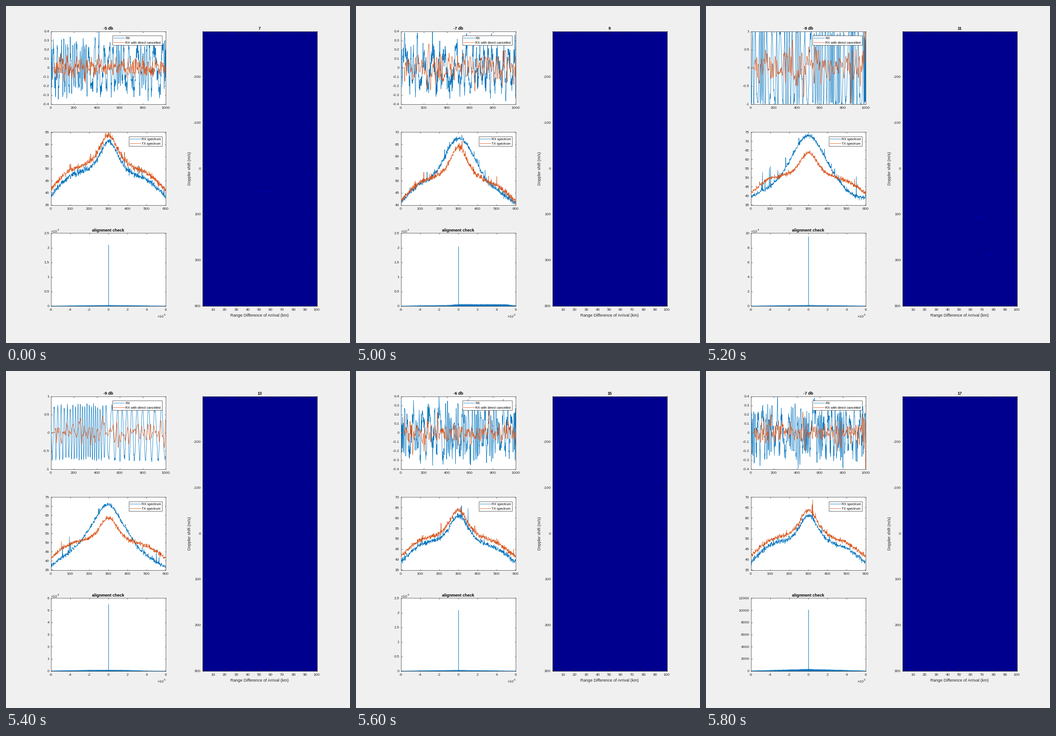
Animation, 756 px wide and 741 px high, one loop 6 s. Source, as a matplotlib script:

```python
import numpy as np
import matplotlib.pyplot as plt
from matplotlib.animation import FuncAnimation
from matplotlib.patches import Rectangle

W, H, DPI = 756, 741, 64
PX = 72 / DPI                      # points per pixel
INK = "#262626"
BLUE, ORANGE = "#0072BD", "#D95319"
HAIR = 0.7 * PX
STEP_MS, FRAMES, HOLD = 200, 30, 25

plt.rcParams.update({
    "font.family": "Liberation Sans",
    "axes.unicode_minus": False,
    "axes.edgecolor": INK,
    "axes.linewidth": HAIR,
    "text.color": INK,
})

# Spectrum levels in dB at these bins
NODES = [0, 50, 100, 150, 200, 225, 250, 275, 300,
         325, 350, 375, 400, 450, 500, 550, 600]
TX = [41.5, 46, 49.5, 50.8, 52.5, 54.2, 57.2, 62, 64.2,
      62.2, 57.8, 54.5, 52, 49.8, 48.3, 45.2, 41.3]
RX_LOW = [38.7, 43.5, 47, 48.5, 49.8, 51.8, 55, 59.5, 61.5,
          60, 55.5, 52, 49.3, 47, 45.5, 42.3, 38.4]
RX_WIDE = [40.8, 45.5, 48.8, 50.5, 55, 59, 63.3, 66.3, 67.6,
           67, 64.3, 61, 57, 49.5, 46.5, 43.3, 40.6]
RX_HIGH = [39, 42.5, 45, 50.3, 58.5, 63.5, 68.5, 72, 73.3,
           72.2, 68.5, 64, 58.5, 49.5, 43, 39.7, 38.6]
RX_PEAK = [37, 41.3, 45, 49.8, 57.5, 61.5, 66, 70, 71.3,
           69.5, 65.3, 60.5, 56.5, 48, 43, 39.5, 36.5]

# wave: limit, tick step, amplitude, noise, mean rate
# rest: level and smoothness of the cancelled signal
# corr: top, tick step, peak, exponent;  blips: km, m/s, strength
SCENES = [
    dict(db=-5, num=7, wave=(.4, .1, .23, .06, .042), rest=(.05, 1.3),
         rx=RX_LOW, span=(35, 65), spikes={},
         corr=(2.5, .5, 2.1, 4), env=([-6, 0, 6], [.004, .027, .004]),
         blips=[(56.6, 50, .3)]),
    dict(db=-7, num=9, wave=(.4, .1, .2, .075, .024), rest=(.085, 2.5),
         rx=RX_WIDE, span=(40, 70), spikes={},
         corr=(2.5, .5, 2.04, 4),
         env=([-6, -4, -1, 0, 5, 6], [.003, .015, .028, .06, .055, .012]),
         blips=[]),
    dict(db=-9, num=11, wave=(1, .5, 1.02, .08, .045), rest=(.26, 2.5),
         rx=RX_HIGH, span=(35, 75),
         spikes={61: 53, 97: 55.5, 103: 56.3, 122: 49, 142: 51.5,
                 182: 61, 551: 50.6},
         corr=(10, 2, 9.5, 4), env=([-6, 0, 6], [.02, .11, .02]),
         blips=[(67.4, 106, .24), (77.7, 187, .24), (55, 226, .06)]),
    dict(db=-9, num=13, wave=(1, .5, .73, .04, None), rest=(.15, 3.5),
         rx=RX_PEAK, span=(35, 75),
         spikes={61: 48, 97: 53.3, 103: 50, 551: 46},
         corr=(6, 1, 5.5, 4),
         env=([-6, -2, 0, 2, 4, 6], [.02, .075, .08, .07, .02, .004]),
         blips=[(43.5, -33, .14)]),
    dict(db=-6, num=15, wave=(.4, .1, .21, .075, .05), rest=(.065, 2),
         rx=RX_LOW, span=(35, 70), spikes={},
         corr=(2.5, .5, 2.08, 4), env=([-6, 0, 6], [.004, .03, .004]),
         blips=[(43.5, -50, .1), (41, -281, .05)]),
    dict(db=-7, num=17, wave=(.4, .1, .21, .07, .05), rest=(.06, 1.8),
         rx=RX_LOW, span=(35, 70), spikes={},
         corr=(12000, 2000, 10100, 0), env=([-6, 0, 6], [40, 310, 40]),
         blips=[(59.5, -157, .14), (73.5, 162, .08)]),
]

N = np.arange(1000)
BINS = np.arange(600)
LAGS = np.linspace(-6, 6, 506)


def smooth(x, width):
    """Gaussian blur with repeated edges."""
    r = int(3 * width) + 1
    k = np.exp(-.5 * (np.arange(-r, r + 1) / width) ** 2)
    return np.convolve(np.pad(x, r, mode="edge"), k / k.sum(), "valid")


def noise(rng, width, n=1000):
    x = smooth(rng.standard_normal(n), width)
    return x / x.std()


def received(rng, limit, _, amp, hiss, rate):
    if rate is None:
        period = np.interp(N, [0, 120, 250, 400, 470, 520, 600, 800, 1000],
                           [34, 27, 20, 18, 28, 62, 38, 50, 62])
        freq = 1 / period
    else:
        freq = rate * (.15 + np.abs(noise(rng, 18)))
    y = amp * np.cos(2 * np.pi * (np.cumsum(freq) + .1))
    return np.clip(y + hiss * noise(rng, .8), -limit, limit)


def cancelled(rng, level, width):
    y = level * noise(rng, width) * (.65 + .4 * np.abs(noise(rng, 25)))
    y[:30] = 0
    return y


def spectrum(rng, levels, spikes):
    y = smooth(np.interp(BINS, NODES, levels), 7)
    y += rng.normal(0, .55, BINS.size)
    y += (rng.random(BINS.size) < .05) * rng.exponential(1.2, BINS.size)
    for i, level in spikes.items():
        y[i] = level
    return y


def build(i, s):
    rng = np.random.default_rng(40 + i)
    return dict(
        rx=received(rng, *s["wave"]),
        rest=cancelled(rng, *s["rest"]),
        rx_db=spectrum(rng, s["rx"], s["spikes"]),
        tx_db=spectrum(rng, TX, {}),
        floor=np.interp(LAGS, *s["env"]) * rng.uniform(.8, 1.08, LAGS.size),
    )


DATA = [build(i, s) for i, s in enumerate(SCENES)]

fig = plt.figure(figsize=(W / DPI, H / DPI), dpi=DPI, facecolor="#f0f0f0")


def panel(left, top, right, bottom, tick, face="white"):
    ax = fig.add_axes([left / W, 1 - bottom / H,
                       (right - left) / W, (bottom - top) / H], facecolor=face)
    ax.tick_params(direction="in", top=True, right=True, length=tick * PX,
                   width=HAIR, color=INK, labelcolor=INK, labelsize=8.2 * PX)
    ax.tick_params(axis="x", pad=6 * PX)
    ax.tick_params(axis="y", pad=3.3 * PX)
    return ax


def ticks(axis, lo, hi, step):
    v = np.round(np.arange(lo, hi + step / 2, step), 6) + 0.0
    axis.set_ticks(v, [f"{x:g}" for x in v])


wave = panel(98.5, 55.5, 351, 215.5, 2.5)
spec = panel(98.5, 277.5, 351, 437.5, 2.5)
corr = panel(98.5, 499.5, 351, 659.5, 2.5)
radar = panel(431.5, 55.5, 683.5, 659.5, 6, "#00008f")

wave.set_xlim(0, 1000)
spec.set_xlim(0, 600)
corr.set_xlim(-6, 6)
radar.set_xlim(.5, 100.5)
radar.set_ylim(300.2, -299.6)
ticks(wave.xaxis, 0, 1000, 200)
ticks(spec.xaxis, 0, 600, 100)
ticks(corr.xaxis, -6, 6, 2)
ticks(radar.xaxis, 10, 100, 10)
ticks(radar.yaxis, -200, 300, 100)


def curve(ax, x, color, width=.8):
    return ax.plot(x, np.zeros(len(x)), color=color, lw=width * PX, zorder=3)[0]


rx_line, rest_line = curve(wave, N, BLUE), curve(wave, N, ORANGE)
rx_spec, tx_spec = curve(spec, BINS, BLUE), curve(spec, BINS, ORANGE)
floor_line = curve(corr, LAGS, BLUE, .6)
peak_line = curve(corr, [0, 0], BLUE, 1)


def blip(km, speed, strength):
    parts = []
    for half, k in ((1.7, .5), (.8, 1)):
        parts.append(radar.hlines(speed, km - half, km + half, lw=1.6 * PX,
                                  color=(0, 0, .56 + k * strength)))
    return parts


def shade(s, d):
    return corr.fill_between(LAGS, 0, d["floor"], color=BLUE, lw=0, zorder=3)


extras = [[shade(s, d)] + [p for b in s["blips"] for p in blip(*b)]
          for s, d in zip(SCENES, DATA)]

# Overlay in pixel coordinates for text and legends
over = fig.add_axes([0, 0, 1, 1], zorder=5)
over.set(xlim=(0, W), ylim=(H, 0))
over.axis("off")


def label(x, y, text, size, **kw):
    return over.text(x, y, text, fontsize=size * PX, **kw)


def title(x, y, text=""):
    return label(x, y, text, 9, weight="bold", color="black", ha="center")


def power(x, y, exp):
    return [label(x, y, "×10", 8.2), label(x + 14.2, y - 3.8, str(exp), 6.4)]


def legend(left, top, right, bottom, names):
    over.add_patch(Rectangle((left, top), right - left, bottom - top,
                             fc="white", ec=INK, lw=HAIR))
    for i, (name, color) in enumerate(zip(names, (BLUE, ORANGE))):
        y = top + 5.8 + 10 * i
        over.plot([left + 2.5, left + 26.5], [y, y], color=color, lw=.8 * PX)
        label(left + 28.5, y + 2.7, name, 7.4, color="black")


db_title = title(224.8, 51.5)
num_title = title(557.5, 51.5)
title(224.8, 495.5, "alignment check")
label(557.5, 683, "Range Difference of Arrival (km)", 9, ha="center")
label(403.5, 357, "Doppler shift (m/s)", 9, rotation=90,
      ha="center", va="center")
power(332.8, 685, 5)
scale_text = power(98.5, 498, 4)
legend(233.5, 64.5, 342.5, 85.5, ["RX", "RX with direct cancelled"])
legend(269.5, 286.5, 342.5, 307.5, ["RX spectrum", "TX spectrum"])


def draw(frame):
    i = max(0, frame - HOLD + 1)
    s, d = SCENES[i], DATA[i]
    limit, step = s["wave"][:2]
    lo, hi = s["span"]
    top, gap, peak, exp = s["corr"]

    wave.set_ylim(-limit, limit)
    ticks(wave.yaxis, -limit, limit, step)
    spec.set_ylim(lo, hi)
    ticks(spec.yaxis, lo, hi, 5)
    corr.set_ylim(0, top)
    ticks(corr.yaxis, 0, top, gap)

    rx_line.set_ydata(d["rx"])
    rest_line.set_ydata(d["rest"])
    rx_spec.set_ydata(d["rx_db"])
    tx_spec.set_ydata(d["tx_db"])
    floor_line.set_ydata(d["floor"])
    peak_line.set_ydata([0, peak])
    db_title.set_text(f"{s['db']} db")
    num_title.set_text(str(s["num"]))
    for t in scale_text:
        t.set_visible(exp > 0)
    for k, group in enumerate(extras):
        for artist in group:
            artist.set_visible(k == i)
    return []


anim = FuncAnimation(fig, draw, frames=FRAMES, interval=STEP_MS,
                     init_func=lambda: draw(0), repeat=True, repeat_delay=0)
plt.show()
```
